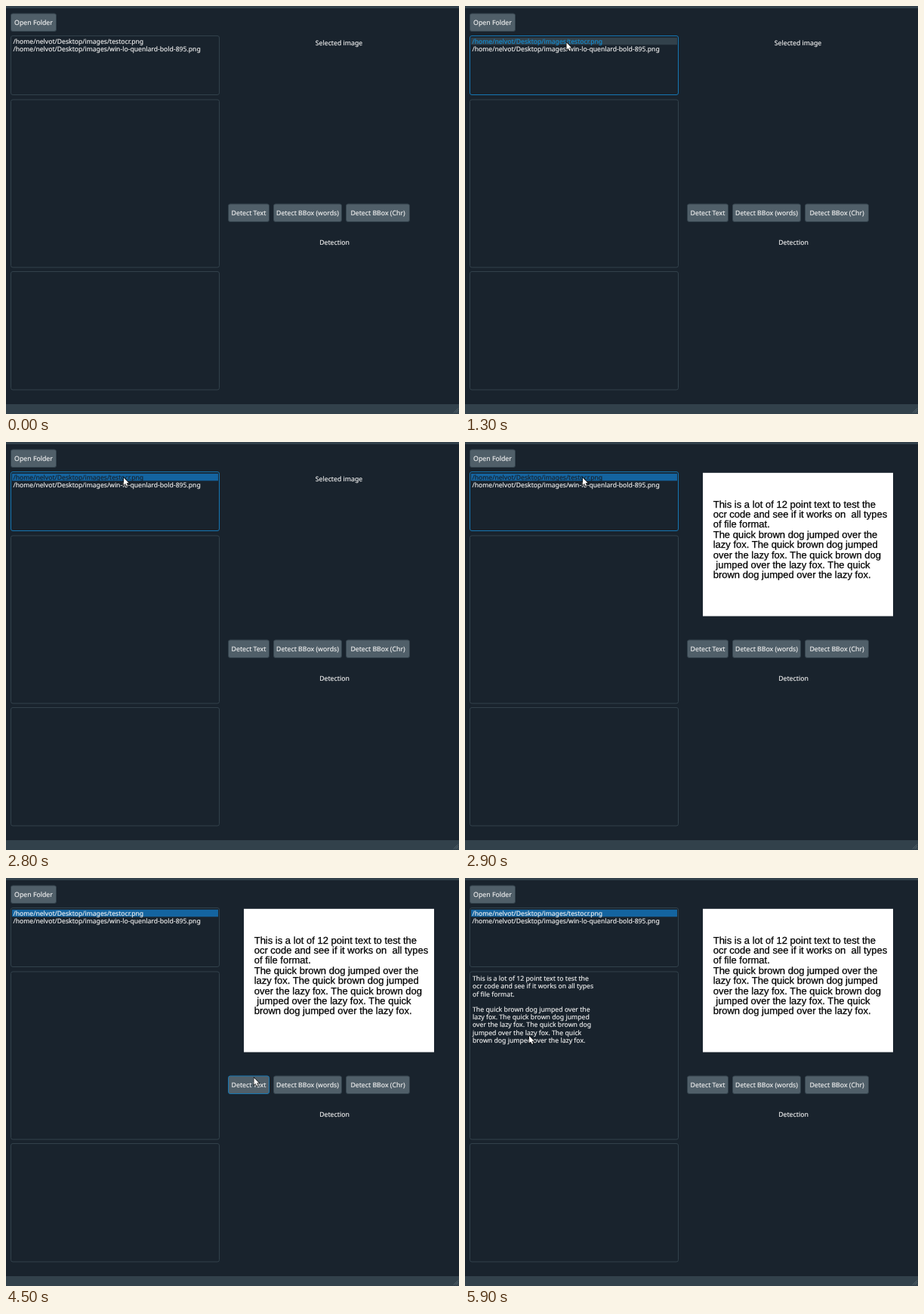
Recreate the animation shown at these times as an HTML page. Size 600 px wide and 540 px high, loop 8000 ms.

```html
<!DOCTYPE html>
<html lang="en">
<head>
<meta charset="utf-8">
<title>Text detection tool</title>
<style>
  html, body { margin: 0; width: 100%; height: 100%; overflow: hidden; background: #19232d; }
  svg { display: block; width: 600px; height: 540px; }
  text {
    font: 8.75px "Noto Sans", "Open Sans", sans-serif; color: #f0f0f0;
    fill: currentColor; stroke: currentColor; stroke-width: .15px;
    white-space: pre; text-rendering: geometricPrecision;
  }
  .mid { text-anchor: middle; }
  .path { font-size: 8.65px; }
  .result { font-size: 8.73px; }
  .scan { font: 13px "Liberation Sans", Arial, sans-serif; color: #000; stroke-width: .25px; }
  .panel { fill: none; stroke: #32414b; }
  .button { fill: #505f69; stroke: #32414b; }
  .hot { stroke: #1676b2; }
</style>
</head>
<body>
<svg id="stage" viewBox="0 0 600 540" xmlns="http://www.w3.org/2000/svg"></svg>
<script>
const LOOP = 8000, STEP = 100;
const APPEAR = 500, SELECT = 2800, SHOW_IMAGE = 2900, SHOW_RESULT = 4900;
const INK = '#f0f0f0', DARK = '#19232d', SLATE = '#32414b', BLUE = '#148cd2', PICKED = '#1464a0';

// pointer strokes; each slows towards its end, bend is a curve's control point
const START = [364, 288];
const MOVES = [
  { from: 500, to: 1300, end: [134.5, 48.5] },
  { from: 1300, to: 1400, end: [136, 47.5] },
  { from: 1600, to: 1900, end: [158.5, 61.5] },
  { from: 2100, to: 2600, end: [156, 47.5] },
  { from: 3200, to: 3800, end: [419, 305], bend: [720, 300] },
  { from: 3800, to: 4500, end: [328.5, 264.5], bend: [370, 235] },
  { from: 5400, to: 5900, end: [85, 209] }
];

const stage = document.getElementById('stage');

function add(tag, attrs, parent = stage, content = '') {
  const node = document.createElementNS('http://www.w3.org/2000/svg', tag);
  for (const key in attrs) node.setAttribute(key, attrs[key]);
  node.textContent = content;
  parent.appendChild(node);
  return node;
}

const box = (x, y, width, height, attrs, parent) => add('rect', { x, y, width, height, ...attrs }, parent);
const label = (x, y, content, cls, parent) => add('text', { x, y, class: cls }, parent, content);
const frame = (x, y, w, h, cls) => box(x + .5, y + .5, w - 1, h - 1, { rx: 2.5, class: cls });
const lines = (x, y, pitch, content, cls, parent) =>
  content.split('\n').forEach((line, i) => label(x, y + i * pitch, line, cls, parent));

function button(x, y, w, caption) {
  const area = [x, y, w, 24.5];
  const rect = frame(...area, 'button');
  label(x + w / 2, y + 15.2, caption, 'mid');
  return { rect, area };
}

// window
box(0, 0, 600, 540, { fill: DARK });
box(0, 0, 600, 3, { fill: SLATE });
box(0, 527, 600, 13, { fill: SLATE });
add('path', { d: 'M593 538.5L599 532.5M595.5 538.5L599 535M598 538.5L599 537.5', stroke: '#65737b', 'stroke-width': .7 });

button(6, 9.5, 61, 'Open Folder');
const listArea = [6, 39, 277, 79];
const list = frame(...listArea, 'panel');
frame(6, 123.5, 277, 223, 'panel');
frame(6, 351, 277, 157.5, 'panel');

const rows = ['testocr', 'win-lo-quenlard-bold-895'].map((file, i) => {
  const area = [8, 41.8 + i * 10, 273, 9.5];
  return {
    area,
    back: box(...area),
    text: label(9.5, 50 + i * 10.1, `/home/nelvot/Desktop/images/${file}.png`, 'path')
  };
});

const buttons = [
  button(294, 261.5, 55, 'Detect Text'),
  button(354, 261.5, 91, 'Detect BBox (words)'),
  button(450, 261.5, 85, 'Detect BBox (Chr)')
];

const hint = label(441, 51.6, 'Selected image', 'mid');
label(435, 315.6, 'Detection', 'mid');

const image = add('g', {});
box(315, 40.8, 252, 189.7, { fill: '#fff' }, image);
lines(328.7, 86.7, 13.36, `This is a lot of 12 point text to test the
ocr code and see if it works on  all types
of file format.
The quick brown dog jumped over the
lazy fox. The quick brown dog jumped
over the lazy fox. The quick brown dog
 jumped over the lazy fox. The quick
brown dog jumped over the lazy fox.`, 'scan', image);

const result = add('g', {});
lines(10, 136.2, 10.2, `This is a lot of 12 point text to test the
ocr code and see if it works on all types
of file format.

The quick brown dog jumped over the
lazy fox. The quick brown dog jumped
over the lazy fox. The quick brown dog
jumped over the lazy fox. The quick
brown dog jumped over the lazy fox.`, 'result', result);

const pointer = add('path', {
  d: 'M0 0V10.4L2.4 8.2L4.1 12L5.8 11.3L4.1 7.5H7.4Z',
  fill: '#fff', stroke: '#000', 'stroke-width': 1.3, 'paint-order': 'stroke'
});

function locate(t) {
  let pos = START;
  for (const { from, to, end, bend } of MOVES) {
    if (t <= from) break;
    const left = 1 - Math.min(1, (t - from) / (to - from));
    const u = 1 - left * left, v = 1 - u;
    pos = pos.map((p, i) => {
      const mid = bend ? bend[i] : (p + end[i]) / 2;
      return v * v * p + 2 * u * v * mid + u * u * end[i];
    });
  }
  return pos;
}

const show = (node, on) => node.setAttribute('visibility', on ? 'visible' : 'hidden');

function draw(time) {
  // the screen refreshes ten times a second
  const t = Math.floor((time % LOOP) / STEP) * STEP;
  const [px, py] = locate(t);
  const over = ([x, y, w, h]) =>
    t >= APPEAR && px >= x && px < x + w && py >= y && py < y + h;

  show(pointer, t >= APPEAR);
  pointer.setAttribute('transform', `translate(${px} ${py}) scale(.9)`);

  list.classList.toggle('hot', over(listArea));
  for (const b of buttons) b.rect.classList.toggle('hot', over(b.area));

  rows.forEach((row, i) => {
    const hover = over(row.area), picked = i === 0 && t >= SELECT;
    row.back.style.fill = picked ? PICKED : hover ? SLATE : 'none';
    row.text.style.color = !hover ? INK : picked ? DARK : BLUE;
  });

  show(hint, t < SHOW_IMAGE);
  show(image, t >= SHOW_IMAGE);
  show(result, t >= SHOW_RESULT);
}

const start = performance.now();
function tick() {
  draw(performance.now() - start);
  requestAnimationFrame(tick);
}
tick();
</script>
</body>
</html>
```
